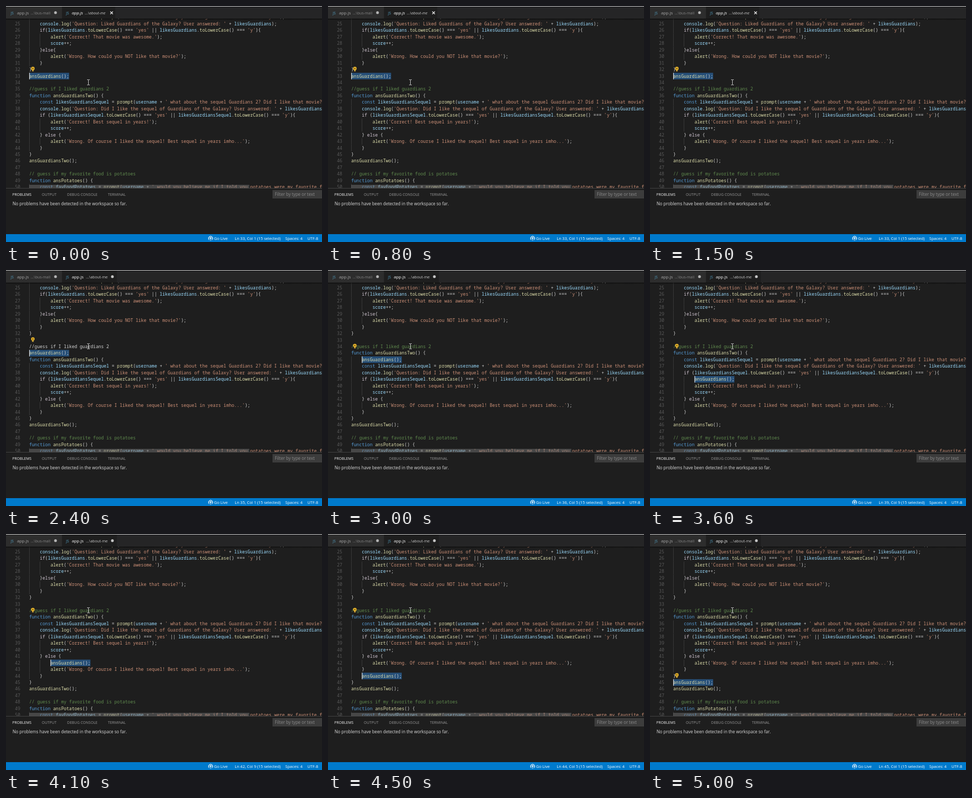
Write an HTML page with a canvas that moves like this. It is 600 px wide and 450 px high and loops after 5.1 s.

```html
<!DOCTYPE html>
<html lang="en">
<head>
<meta charset="utf-8">
<title>Moving a line in an editor</title>
<style>
html, body { margin: 0; height: 100%; overflow: hidden; background: #1e1e1e; }
canvas { display: block; }
</style>
</head>
<body>
<canvas id="stage" width="600" height="450"></canvas>
<script>
const ctx = document.getElementById('stage').getContext('2d');
const LOOP = 5100, FIRST = 24, LEFT = 44, COL = 5.056, ROW = 12.46;
const MONO = '500 8.42px "Noto Sans Mono", monospace';
const MOVED = 'ansGuardians();';

const LINES = `    const likesGuardians = prompt(username + ' Did I enjoy watching Guardians of the Galaxy? ');
    console.log('Question: Liked Guardians of the Galaxy? User answered: ' + likesGuardians);
    if(likesGuardians.toLowerCase() === 'yes' || likesGuardians.toLowerCase() === 'y'){
        alert('Correct! That movie was awesome.');
        score++;
    }else{
        alert('Wrong. How could you NOT like that movie?');
    }
}

//guess if I liked guardians 2
function ansGuardiansTwo() {
    const likesGuardiansSequel = prompt(username + ' what about the sequel Guardians 2? Did I like that movie?');
    console.log('Question: Did I like the sequel of Guardians of the Galaxy? User answered: ' + likesGuardiansSequel);
    if (likesGuardiansSequel.toLowerCase() === 'yes' || likesGuardiansSequel.toLowerCase() === 'y'){
        alert('Correct! Best sequel in years!');
        score++;
    } else {
        alert('Wrong. Of course I liked the sequel! Best sequel in years imho...');
    }
}
ansGuardiansTwo();

// guess if my favorite food is potatoes
function ansPotatoes() {
    const favFoodPotatoes = prompt(username + ' would you believe me if I told you potatoes were my favorite food?');`.split('\n');

// [start time, value] steps
const LINE_STEPS = [[0, 33], [1900, 34], [2400, 35], [2900, 36], [3200, 37], [3400, 38], [3600, 39],
  [3800, 40], [3900, 41], [4100, 42], [4300, 43], [4500, 44], [4700, 45]];
const BULB_STEPS = [[0, 32], [2100, 33], [2700, 34], [4700, 0], [4900, 44]];
const at = (steps, t) => steps.filter(s => s[0] <= t).pop()[1];

const TOKENS = [
  [/^\/\/.*/, '#608b4e'],
  [/^'[^']*'/, '#ce9178'],
  [/^(const|function)\b/, '#569cd6'],
  [/^(if|else)\b/, '#d0c4d0'],
  [/^\w+(?=\()/, '#dcdcaa'],
  [/^\w+/, '#9cdcfe'],
  [/^[^\w'\/]+/, '#d4d4d4']
];

const rowY = n => 133.6 + (n - 33) * ROW;
const indentOf = line => line.search(/\S|$/);
const indentAfter = line => indentOf(line) + (line.endsWith('{') ? 4 : 0);

function rect(x, y, w, h, color) {
  ctx.fillStyle = color;
  ctx.fillRect(x, y, w, h);
}

function dot(x, y, r, color) {
  ctx.fillStyle = color;
  ctx.beginPath();
  ctx.arc(x, y, r, 0, 7);
  ctx.fill();
}

function stroke(path, color, width = 1) {
  ctx.strokeStyle = color;
  ctx.lineWidth = width;
  ctx.stroke(new Path2D(path));
}

function label(text, x, y, size, color, style = '') {
  ctx.font = `${style} ${size}px "Open Sans", sans-serif`;
  ctx.fillStyle = color;
  ctx.fillText(text, x, y);
}

function codeLine(text, y, plain) {
  for (let col = 0; col < indentOf(text); col += 4) {
    rect(Math.round(LEFT + col * COL), y - ROW / 2, 1, ROW, '#383838');
  }
  for (let i = 0; i < text.length;) {
    const rest = text.slice(i);
    const [pattern, color] = TOKENS.find(([p]) => p.test(rest));
    const token = rest.match(pattern)[0];
    ctx.fillStyle = plain || color;
    // each character sits on the column grid
    [...token].forEach((ch, k) => ctx.fillText(ch, LEFT + (i + k) * COL, y + 2.9));
    i += token.length;
  }
}

function drawCode(t, current, indent) {
  const lines = LINES.slice();
  lines.splice(current - FIRST, 0, ' '.repeat(indent) + MOVED);
  const x = LEFT + indent * COL, top = rowY(current) - ROW / 2;
  rect(x, top, MOVED.length * COL, ROW, '#264f78');
  ctx.font = MONO;
  lines.forEach((text, i) => {
    const n = FIRST + i, y = rowY(n);
    ctx.fillStyle = '#5a5a5a';
    ctx.fillText(n, 17, y + 2.9);
    const untokenized = n === 34 && t >= 2400 && t < 2500;
    codeLine(text, y, untokenized && '#d4d4d4');
  });
  rect(x, top, 1.2, ROW, '#e0e0e0');

  const bulb = at(BULB_STEPS, t);
  if (bulb) {
    const y = rowY(bulb) - 1.5;
    dot(51, y - .5, 3.3, '#e8b52c');
    dot(51, y - .5, 1.3, '#7a5a10');
    rect(49.5, y + 2.4, 3, 2.6, '#c9a23a');
  }
  rect(LEFT, 341, 418, 6, 'rgba(121,121,121,.45)');
  stroke('M154 140.5h2l.5 .5 .5 -.5h2M156.5 141v9M154 150.5h2l.5 -.5 .5 .5h2', '#dcdcdc', .9);
}

function drawTabs(edited) {
  rect(0, 0, 600, 24, '#252526');
  rect(0, 0, 106, 24, '#2d2d2d');
  rect(106.5, 0, edited ? 104 : 101, 24, '#1e1e1e');
  rect(0, 0, 600, 1, '#d0d0d0');
  const shade = ctx.createLinearGradient(0, 24, 0, 27);
  shade.addColorStop(0, 'rgba(0,0,0,.5)');
  shade.addColorStop(1, 'rgba(0,0,0,0)');
  rect(0, 24, 600, 3, shade);

  const style = edited ? '' : 'italic';
  label('JS', 9, 15.5, 7, '#519aba');
  label('app.js', 21, 15.6, 8, '#a8a8a8');
  label('...\\bus-mall', 47, 15.6, 7.2, '#858585');
  dot(94, 12.7, 2.6, '#b4b4b4');
  label('JS', 114, 15.5, 7, '#519aba');
  label('app.js', 125, 15.6, 8, '#ffffff', style);
  label('...\\about-me', edited ? 152 : 150, 15.6, 7.2, '#c8c8c8', style);
  if (edited) dot(202, 12.7, 2.6, '#c5c5c5');
  else stroke('M198 10.5l5 5m0 -5l-5 5', '#e8e8e8', 1.4);
}

function drawPanel() {
  rect(0, 347, 600, 90, '#1e1e1e');
  rect(0, 347, 600, 1, '#424242');
  label('PROBLEMS', 12, 361.5, 7.05, '#f0f0f0');
  label('OUTPUT', 68, 361.5, 7.05, '#989898');
  label('DEBUG CONSOLE', 116, 361.5, 7.05, '#989898');
  label('TERMINAL', 193.5, 361.5, 7.05, '#989898');
  rect(506, 351, 94, 16, '#3c3c3c');
  label('Filter by type or text', 510.5, 362, 8.15, '#8c8c8c');
  label('No problems have been detected in the workspace so far.', 12.5, 380, 8.08, '#dcdcdc');
}

function drawStatus(current, indent) {
  rect(0, 435, 600, 15, '#007acc');
  const text = (s, x) => label(s, x, 446, 7.6, '#ffffff');
  dot(388.5, 442.5, 1.4, '#fff');
  stroke('M386.5 445.2a3.2 3.2 0 1 1 4 0M386.2 446.6a4.2 4.2 0 1 1 4.6 0M388.5 443v4.5', '#ffffff', .8);
  text('Go Live', 395);
  text(`Ln ${current}, Col ${indent + 1} (${MOVED.length} selected)`, 434.3);
  text('Spaces: 4', 530.3);
  text('UTF-8', 572.3);
}

function frame(now) {
  const t = now % LOOP;
  const current = at(LINE_STEPS, t);
  const indent = indentAfter(LINES[current - FIRST - 1]);
  rect(0, 0, 600, 450, '#1e1e1e');
  drawCode(t, current, indent);
  drawTabs(current > 33);
  drawPanel();
  drawStatus(current, indent);
  requestAnimationFrame(frame);
}
requestAnimationFrame(frame);
</script>
</body>
</html>
```
